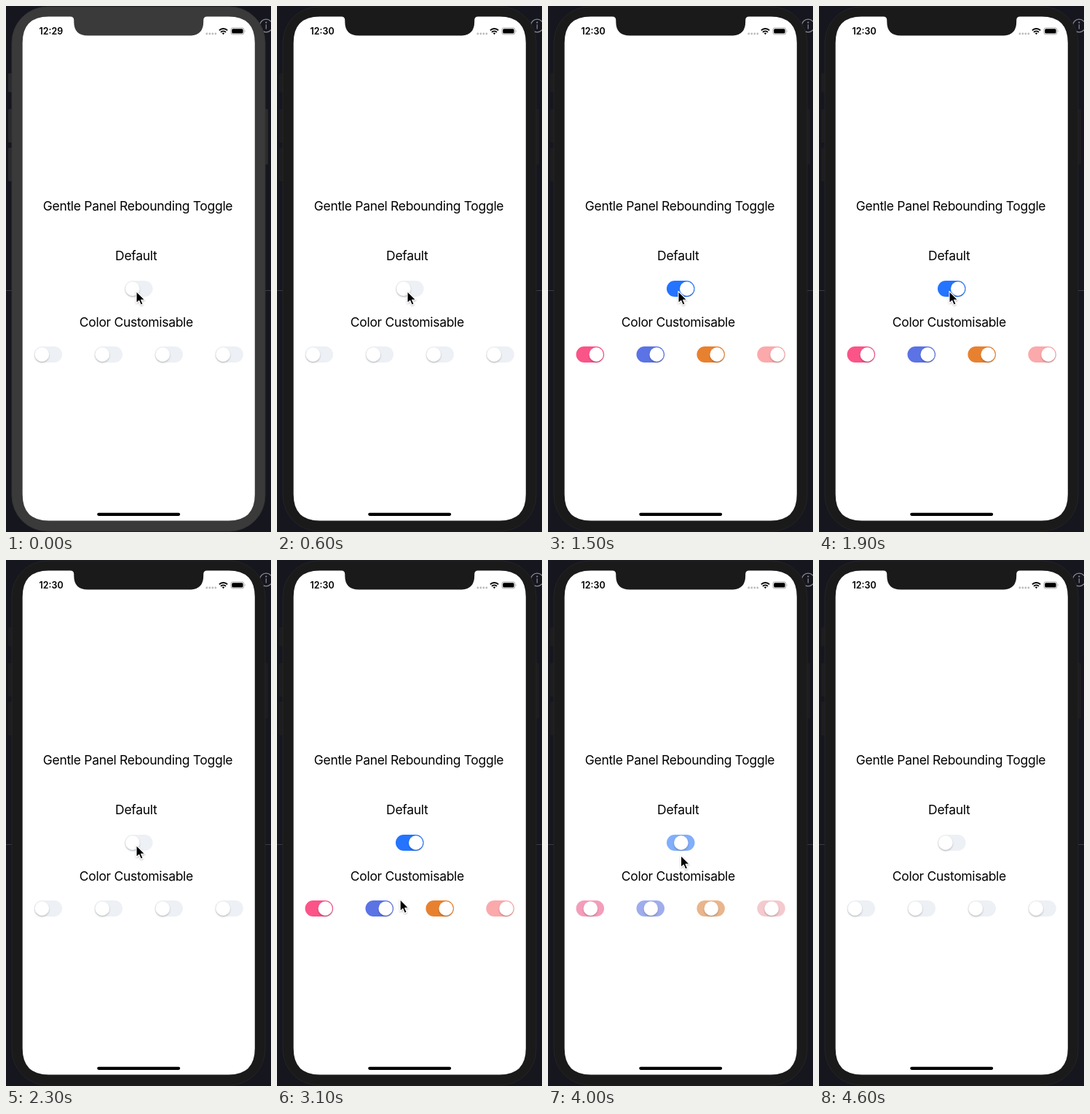
Write an HTML page that moves like this. It is 364 by 720 pixels and loops after 5.3 s.

```html
<!DOCTYPE html>
<html lang="en">
<head>
<meta charset="utf-8">
<title>Toggle demo</title>
<style>
  html, body { margin: 0; width: 100%; height: 100%; overflow: hidden; background: #15161e; }
  svg { display: block; width: 100%; height: 100%; }
  text { font-family: Inter, "Liberation Sans", sans-serif; }
  .label { font-size: 17.5px; letter-spacing: -0.31px; }
  .clock { font-size: 12.5px; font-weight: 600; }
</style>
</head>
<body>
<svg viewBox="0 0 364 720">
  <defs>
    <filter id="lift" x="-40%" y="-40%" width="180%" height="180%">
      <feDropShadow dx="0" dy="1.3" stdDeviation="1.2" flood-color="#000" flood-opacity=".28"/>
    </filter>
    <filter id="soft" x="-40%" y="-40%" width="180%" height="180%">
      <feDropShadow dx="0" dy="1" stdDeviation=".9" flood-color="#000" flood-opacity=".3"/>
    </filter>
  </defs>
  <rect width="364" height="720" fill="#15161e"/>
  <path d="M0 389.5H364" stroke="#3b3c43"/>
  <g fill="none" stroke="#8b8c92" stroke-width="1.2">
    <circle cx="357.3" cy="27" r="8.8"/>
    <path d="M357.3 25.2v6.4"/>
    <circle cx="357.3" cy="22.6" r=".5" fill="#8b8c92"/>
  </g>
  <g id="keys">
    <rect x="3" y="92" width="8" height="26" rx="1.5"/>
    <rect x="3" y="141" width="8" height="46" rx="1.5"/>
    <rect x="3" y="194" width="8" height="46" rx="1.5"/>
    <rect x="353" y="141" width="7" height="76" rx="1.5"/>
  </g>
  <rect id="body" x="8" y="1" width="348" height="718" rx="49"/>
  <path fill="#fff" d="M58.7 14.5H88.3Q93.3 14.5 93.3 19.5V21.5Q93.3 40.5 112.3 40.5H252.2Q271.2 40.5 271.2 21.5V19.5Q271.2 14.5 276.2 14.5H305.8Q341.8 14.5 341.8 50.5V668.4Q341.8 704.4 305.8 704.4H58.7Q22.7 704.4 22.7 668.4V50.5Q22.7 14.5 58.7 14.5Z"/>
  <text id="clock" class="clock" x="45.5" y="39"></text>
  <g fill="#bcbcbe">
    <circle cx="275.8" cy="38" r="1.4"/>
    <circle cx="279.8" cy="38" r="1.4"/>
    <circle cx="283.8" cy="38" r="1.4"/>
    <circle cx="287.8" cy="38" r="1.4"/>
  </g>
  <g fill="none" stroke="#000" stroke-width="1.9">
    <path d="M292.9 33.3a7.8 7.8 0 0 1 11.2 0M295 35.8a4.9 4.9 0 0 1 7 0"/>
    <path d="M298.5 39.2l-1.7-1.9a2.5 2.5 0 0 1 3.4 0z" fill="#000" stroke="none"/>
  </g>
  <rect x="308.9" y="29.9" width="18" height="9" rx="2.6" fill="none" stroke="#999" stroke-width=".8"/>
  <rect x="310.2" y="31.2" width="15.4" height="6.4" rx="1.5"/>
  <path d="M327.9 32.8q1.5 1.6 0 3.2z" fill="#999"/>
  <text class="label" x="181" y="279.5" text-anchor="middle">Gentle Panel Rebounding Toggle</text>
  <text class="label" x="150.1" y="348">Default</text>
  <text class="label" x="100.8" y="438.5">Color Customisable</text>
  <g id="switches"></g>
  <rect x="125.2" y="693.7" width="114" height="4.2" rx="2.1"/>
  <path id="cursor" filter="url(#soft)" stroke="#fff" stroke-width="1.1" stroke-linejoin="round"
    d="M0 0V16.2L3.7 12.8L6.2 18.8L9.1 17.6L6.6 11.7H11.6Z"/>
</svg>
<script>
const LOOP = 5300, STEP = 100, SLIDE = 300;
const NS = "http://www.w3.org/2000/svg";
const OFF = [237, 240, 245];
const $ = id => document.getElementById(id);

// left edge, top edge, active colour
const switches = [
  [163, 376, [36, 116, 255]],
  [38.6, 466, [250, 84, 136]],
  [121.5, 466, [91, 115, 228]],
  [204.4, 466, [232, 129, 47]],
  [287.3, 466, [251, 169, 171]]
].map(([x, y, on]) => ({
  x, on,
  track: add("rect", { x, y, width: 38.5, height: 22, rx: 11 }),
  thumb: add("circle", { cy: y + 11, r: 9.7, fill: "#fff", filter: "url(#lift)" })
}));

// time, x, y of the pointer tip
const route = [
  [2700, 179, 390.5], [3050, 169, 464.5], [3400, 170, 465],
  [3800, 180, 393], [3900, 181, 395], [4000, 182.5, 404.5],
  [4200, 140, 392], [4500, -5, 336.5]
];

function add(tag, attrs) {
  const el = document.createElementNS(NS, tag);
  for (const k in attrs) el.setAttribute(k, attrs[k]);
  return $("switches").appendChild(el);
}

const clamp = v => Math.max(0, Math.min(1, v));
const ease = v => v < .5 ? 2 * v * v : 1 - 2 * (1 - v) ** 2;
const mix = (a, b, k) => a + (b - a) * k;
const blend = (a, b, k) => `rgb(${a.map((v, i) => Math.round(mix(v, b[i], k)))})`;
const slide = (t, start) => ease(clamp((t - start) / SLIDE));

function pointer(t) {
  if (t <= route[0][0]) return route[0].slice(1);
  const i = route.findIndex(p => p[0] >= t);
  if (i < 0) return [-40, 336];
  const [t0, x0, y0] = route[i - 1], [t1, x1, y1] = route[i];
  const k = (t - t0) / (t1 - t0);
  return [mix(x0, x1, k), mix(y0, y1, k)];
}

function draw(t) {
  const dim = clamp((t - 400) / 200);
  $("body").setAttribute("fill", blend([58, 58, 58], [26, 26, 26], dim));
  $("body").setAttribute("stroke", blend([50, 50, 51], [36, 36, 38], dim));
  $("keys").setAttribute("fill", blend([42, 42, 43], [29, 29, 31], dim));
  $("clock").textContent = t < 500 ? "12:29" : "12:30";

  const on = slide(t, 720) - slide(t, 1970) + slide(t, 2740) - slide(t, 3855);
  for (const s of switches) {
    s.track.setAttribute("fill", blend(OFF, s.on, on));
    s.thumb.setAttribute("cx", s.x + mix(10.8, 27.7, on));
  }
  $("cursor").setAttribute("transform", `translate(${pointer(t)})`);
}

const start = performance.now();
function tick() {
  const t = (performance.now() - start) % LOOP;
  draw(Math.floor(t / STEP) * STEP);
  requestAnimationFrame(tick);
}
tick();
</script>
</body>
</html>
```
